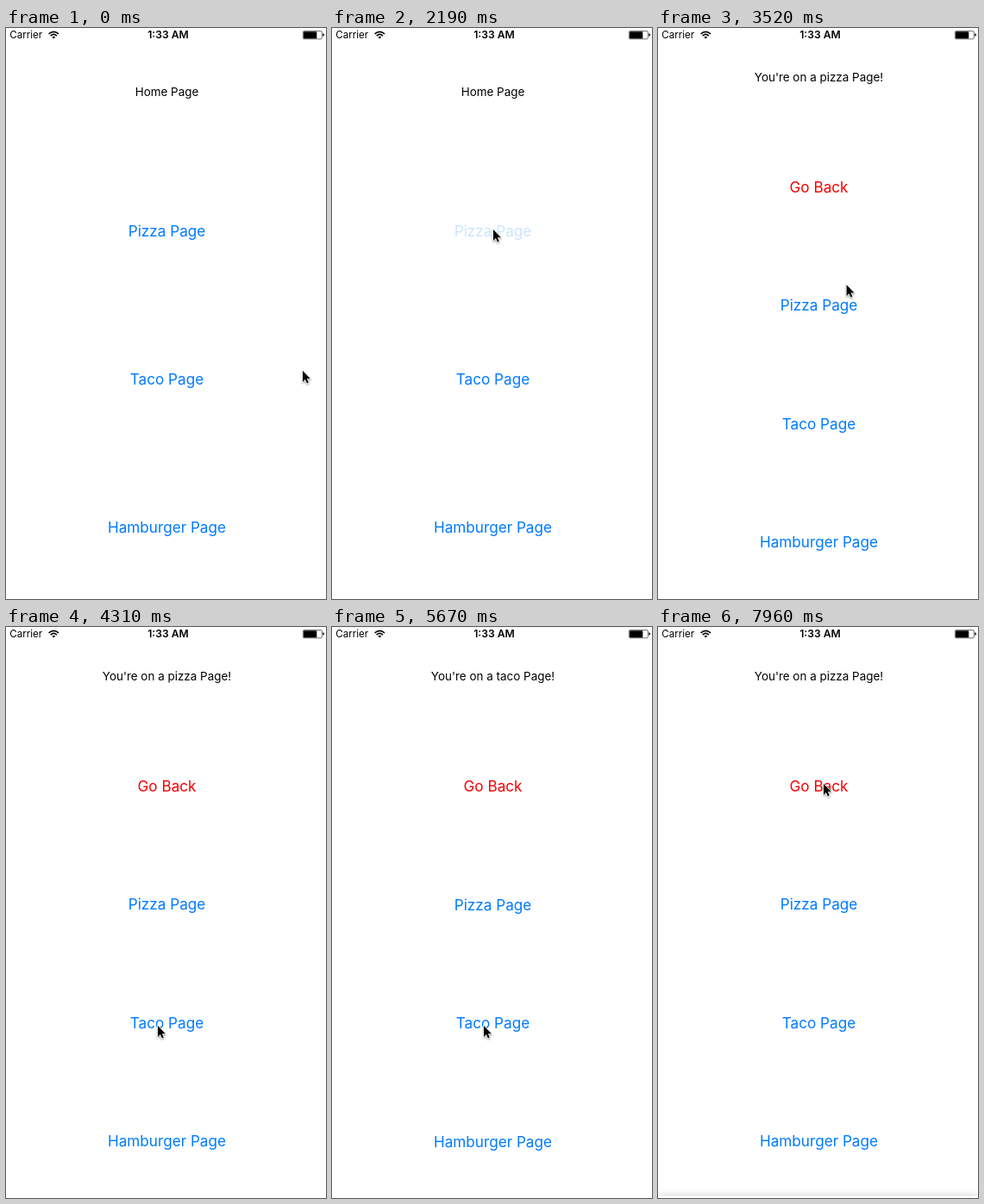
Write an HTML page that moves like this. It is 371 by 663 pixels and loops after 8 s.

```html
<!DOCTYPE html>
<html lang="en">
<head>
<meta charset="utf-8">
<title>Page navigation</title>
<style>
  html, body { margin: 0; width: 100%; height: 100%; overflow: hidden; background: #fff; }
  svg { display: block; width: 371px; height: 663px; font-family: Inter, "Liberation Sans", sans-serif; }
  .sheet { fill: #fff; filter: drop-shadow(0 0 5px rgba(0, 0, 0, .2)); }
  .page text { text-anchor: middle; font-size: 17.15px; fill: #007aff; }
  .page .title { font-size: 13.45px; fill: #000; }
  .page .back { fill: #f60000; }
  .carrier { font-size: 11.6px; }
  .clock { font-size: 12.2px; font-weight: 600; text-anchor: middle; }
</style>
</head>
<body>
<svg viewBox="0 0 371 663">
  <g id="pages"></g>
  <g>
    <text class="carrier" x="4.2" y="12.4">Carrier</text>
    <g fill="none" stroke="#000" stroke-width="1.6">
      <path d="M49.6 6.9Q55.3 1.7 61 6.9M51.7 9.1Q55.3 5.8 58.9 9.1"/>
      <path d="M55.3 12.4L53.4 10.4Q55.3 8.9 57.2 10.4Z" fill="#000" stroke="none"/>
    </g>
    <text class="clock" x="188" y="12.4">1:33 AM</text>
    <rect x="344.3" y="3.5" width="22" height="9.3" rx="1.5" fill="none" stroke="#333" stroke-width=".7"/>
    <rect x="345" y="4.2" width="15.3" height="8" rx=".8"/>
    <path d="M367.3 6.3Q369 6.6 369 8T367.3 9.7Z"/>
  </g>
  <path id="cursor" d="M0 0V12.9L2.9 10.1L4.9 14.5L6.8 13.7L4.9 9.3H8.9Z" stroke="#fff" stroke-width="1.4"
    paint-order="stroke" style="filter: drop-shadow(0 1px 1px rgba(0, 0, 0, .4))"/>
</svg>
<script>
const W = 371, H = 663, LOOP = 8000;
const links = ["Pizza Page", "Taco Page", "Hamburger Page"];
const clamp = v => Math.min(1, Math.max(0, v));
const span = (t, start, length) => clamp((t - start) / length);
const cubic = (a, b, c, d, s) => {
  const r = 1 - s;
  return r * r * r * a + 3 * r * r * s * b + 3 * r * s * s * c + s * s * s * d;
};

// cubic-bezier(.2833, .99, .3183, .99)
function slide(x) {
  let lo = 0, hi = 1;
  for (let i = 0; i < 24; i++) {
    const mid = (lo + hi) / 2;
    if (cubic(0, .2833, .3183, 1, mid) < x) lo = mid; else hi = mid;
  }
  return x >= 1 ? 1 : cubic(0, .99, .99, 1, lo);
}

function add(parent, tag, attrs, text = "") {
  const el = document.createElementNS("http://www.w3.org/2000/svg", tag);
  for (const key in attrs) el.setAttribute(key, attrs[key]);
  el.textContent = text;
  return parent.appendChild(el);
}

// rows: [text, baseline, class]
function makePage(rows) {
  const el = add(document.getElementById("pages"), "g", { class: "page" });
  add(el, "rect", { class: "sheet", width: W, height: H });
  const texts = rows.map(([text, y, cls = "link"]) => add(el, "text", { x: 186.5, y, class: cls }, text));
  return { el, texts };
}

const subPage = food => makePage([
  [`You're on a ${food} Page!`, 62, "title"],
  ["Go Back", 190.6, "back"],
  ...links.map((text, i) => [text, 328.1 + 137.5 * i])
]);

const home = makePage([["Home Page", 79, "title"], ...links.map((text, i) => [text, 242 + 172 * i])]);
const pizza = subPage("pizza");
const taco = subPage("taco");
const cursor = document.getElementById("cursor");

function place(page, x, y, opacity, visible) {
  page.el.setAttribute("transform", `translate(${x} ${y})`);
  page.el.setAttribute("opacity", opacity);
  page.el.setAttribute("display", visible ? "inline" : "none");
}

// Dims at once, then fades back after 180 ms
function press(el, t, start) {
  el.setAttribute("opacity", t < start ? 1 : .2 + .8 * span(t, start + 180, 250));
}

// start, end, four x and four y control values
const moves = [
  [540, 1290, [344, 295, 215, 187], [398, 345, 262, 234]],
  [3230, 4080, [187, 275, 150, 164], [234, 300, 430, 442]],
  [4080, 4310, [164, 166, 174, 176], [442, 450, 460, 463]],
  [6720, 7290, [176, 215, 225, 192], [463, 330, 125, 182]]
];

function moveCursor(t) {
  const [start, end, xs, ys] = moves.filter(m => t >= m[0]).pop() || moves[0];
  const u = span(t, start, end - start), s = u * u * (3 - 2 * u);
  cursor.setAttribute("transform", `translate(${cubic(...xs, s)} ${cubic(...ys, s)})`);
}

function frame() {
  const t = performance.now() % LOOP;
  const push = slide(span(t, 2355, 520));
  const rise = slide(span(t, 5195, 500)) - slide(span(t, 7600, 440));

  place(home, -.3 * W * push, 0, 1 - .15 * push, push < 1);
  place(pizza, W * (1 - push), 0, 1 - .15 * rise, push > 0 && rise < 1);
  place(taco, 0, H * (1 - rise), 1, rise > 0);

  press(home.texts[1], t, 2190);
  press(pizza.texts[3], t, 5030);
  press(taco.texts[1], t, 7460);
  moveCursor(t);
  requestAnimationFrame(frame);
}
frame();
</script>
</body>
</html>
```
